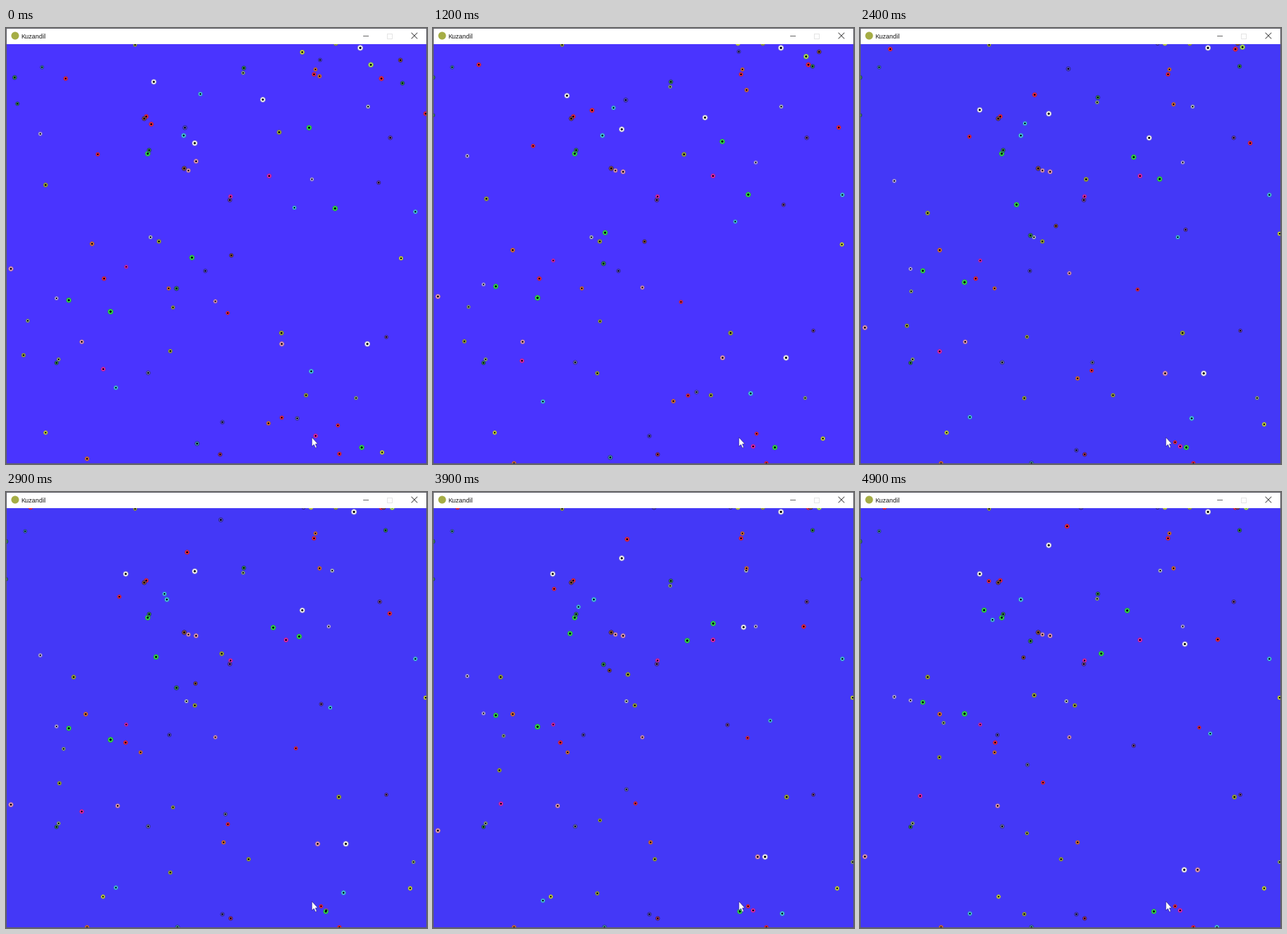
These frames come from a looping animation (600 px wide and 621 px high, 5000 ms). A matplotlib script:

```python
import random
import numpy as np
import matplotlib.pyplot as plt
from matplotlib.animation import FuncAnimation
from matplotlib.colors import to_rgb
from matplotlib.patches import Circle, Polygon, Rectangle

W, H, DPI = 600, 621, 100
FRAMES, INTERVAL = 50, 100
PX = 72 / DPI
TITLE = 23
EARLY_SEA, LATE_SEA, SEA_SHIFT = "#4a34ff", "#4438f7", 18

BRIGHT = {
    "white": "#ffffff", "gray": "#c3ced6", "lilac": "#cabcf2", "pink": "#f7a8bd",
    "red": "#ff2b40", "magenta": "#f92bb4", "orange": "#e8783a", "yellow": "#dcec3c",
    "lime": "#b4f05a", "green": "#35e04c", "olive": "#a4b03c", "moss": "#98b47c",
    "cyan": "#4cd8f0",
}
DARK = {"brown": "#96583c", "wine": "#b83c58", "plum": "#7c4ca0", "navy": "#5c54c8",
        "slate": "#7880b0", "forest": "#3a9c50", "teal": "#48a0b4"}
PALETTE = BRIGHT | DARK

COMPASS = {"N": (0, -1), "NE": (1, -1), "E": (1, 0), "SE": (1, 1),
           "S": (0, 1), "SW": (-1, 1), "W": (-1, 0), "NW": (-1, -1)}
WALLS = np.array([(0, TITLE - 1), (W - 2, H - 1)])

rng = random.Random(11)
creatures = []


def creature(colour, x, y, velocity, reach=np.inf):
    """Walk in a straight line until `reach` strides are made or a wall is met."""
    start, velocity = np.array((x, y), float), np.array(velocity, float)
    for p, v, low, high in zip(start, velocity, *WALLS):
        if v:
            reach = min(reach, ((high if v > 0 else low) - p) / v)
    radius = rng.uniform(3.3, 3.7) if colour in ("white", "lime", "green") else rng.uniform(2.4, 3.2)
    creatures.append((colour, radius, start, velocity, max(reach, 0)))


def herd(heading, *members):
    for colour, x, y in members:
        creature(colour, x, y, COMPASS[heading])


def pair(first, second, x, y, dx, dy):
    """Two creatures that rest against each other."""
    creature(first, x, y, (0, 0))
    creature(second, x + dx, y + dy, (0, 0))


pair("green", "forest", 202, 179, 2, -5)
pair("brown", "pink", 254, 200, 6, 3)
pair("magenta", "plum", 320, 240, -1, 5)
pair("orange", "red", 441, 59, -2, 7)
pair("red", "brown", 200, 126, -3, 3)
pair("moss", "forest", 75, 472, -3, 5)
pair("olive", "olive", 184, 24, 286, -2)

herd("N", ("white", 269, 164), ("lilac", 72, 385), ("red", 535, 72), ("green", 149, 404))
herd("E", ("pink", 108, 447), ("olive", 218, 304), ("gray", 206, 298))
herd("S", ("moss", 338, 64), ("forest", 339, 57), ("olive", 238, 398))
herd("W", ("gray", 516, 112), ("navy", 284, 346))
herd("NE", ("moss", 31, 417), ("olive", 25, 466), ("yellow", 563, 328), ("red", 207, 137))
herd("NW", ("green", 469, 257), ("red", 85, 72))
herd("SW", ("cyan", 277, 94), ("red", 598, 122), ("green", 432, 142))
herd("SE", ("cyan", 411, 256), ("pink", 393, 450))

# Faster creatures with headings between the compass points
creature("pink", 7, 343, (0, 2))
creature("forest", 243, 371, (0, -1.8))
creature("navy", 255, 142, (1, -2))
creature("green", 265, 327, (-1, -1.8))
creature("red", 393, 555, (-1.5, -1.6))
creature("slate", 415, 556, (-2, -1.9))
creature("red", 316, 406, (1.9, -0.8))
creature("white", 515, 450, (-0.6, 1))
creature("white", 366, 102, (1.1, 1.3))
creature("cyan", 435, 489, (0.9, 1.6))

# The rest of the swarm: some roam, some soon settle
for _ in range(48):
    dx, dy = COMPASS[rng.choice(list(COMPASS))]
    speed = rng.choice((0.6, 1, 1, 1.6))
    creature(rng.choice(list(PALETTE)), rng.uniform(5, W - 5), rng.uniform(TITLE + 5, H - 5),
             (dx * speed, dy * speed), rng.choice((15, 40, np.inf)))


def positions(frame):
    strides = max(0, 1.85 * frame - 2.5)
    return [start + velocity * min(strides, reach) for _, _, start, velocity, reach in creatures]


def rim(colour):
    share = 0.25 if colour in DARK else 0.6
    return share * np.array(to_rgb(PALETTE[colour])) + (1 - share) * np.array(to_rgb("#1c1470"))


fig = plt.figure(figsize=(W / DPI, H / DPI), dpi=DPI)
ax = fig.add_axes([0, 0, 1, 1])
ax.set(xlim=(0, W), ylim=(H, 0))
ax.axis("off")

sea = ax.add_patch(Rectangle((0, 0), W, H, fc=EARLY_SEA, lw=0))
colours = [c[0] for c in creatures]
radii = np.array([c[1] for c in creatures])
spots = np.array(positions(0))
bodies = ax.scatter(*spots.T, s=(2 * radii * PX) ** 2, lw=0.9 * PX, zorder=3,
                    c=[PALETTE[c] for c in colours], edgecolors=[rim(c) for c in colours])
cores = ax.scatter(*spots.T, s=(0.9 * radii * PX) ** 2, c="black", lw=0, zorder=4)


def block(x, y, w, h, colour):
    ax.add_patch(Rectangle((x, y), w, h, fc=colour, lw=0, zorder=5))


def stroke(xs, ys, colour):
    ax.plot(xs, ys, color=colour, lw=0.9 * PX, zorder=6)


# Window frame and title bar
block(0, 0, W, TITLE, "white")
for edge in ((0, 0, W, 1), (0, 0, 1, H), (W - 1, 0, 1, H), (0, H - 1, W, 1)):
    block(*edge, "#606068")
ax.add_patch(Circle((13, 11), 5.5, fc="#a5ad45", lw=0, zorder=6))
ax.text(21, 14.6, "Kuzandil", family="Liberation Sans", size=9.2 * PX, color="#1a1a1a", zorder=6)
stroke([508.5, 516], [11, 11], "#555555")
stroke([543, 550, 550, 543, 543], [7.5, 7.5, 14.5, 14.5, 7.5], "#e2e2e2")
stroke([578, 586], [7, 15], "#444444")
stroke([578, 586], [15, 7], "#444444")

# Mouse pointer
ax.add_patch(Polygon([(436, 583), (436, 596), (438.9, 593.4), (441, 598.2), (443, 597.3),
                      (440.9, 592.6), (444.4, 592.3)],
                     fc="white", ec="#2a2090", lw=0.6 * PX, zorder=7))


def update(frame):
    sea.set_facecolor(EARLY_SEA if frame < SEA_SHIFT else LATE_SEA)
    spots = positions(frame)
    bodies.set_offsets(spots)
    cores.set_offsets(spots)
    return sea, bodies, cores


anim = FuncAnimation(fig, update, frames=FRAMES, interval=INTERVAL, repeat=True, repeat_delay=0)
plt.show()
```
